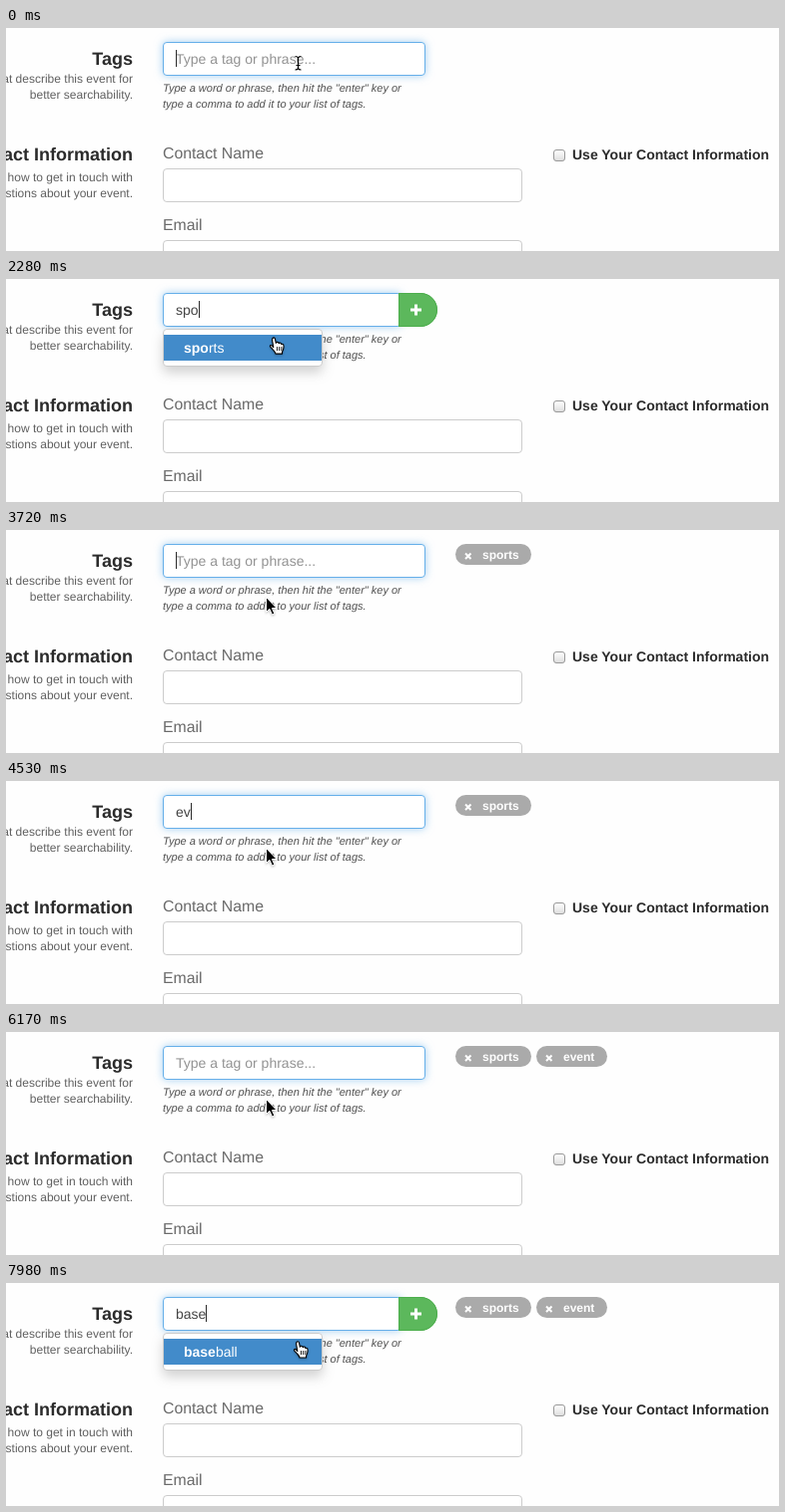
Animation, 774 px wide and 224 px high, one loop 8000 ms. Source, as an HTML page:

```html
<!DOCTYPE html>
<html lang="en">
<head>
<meta charset="utf-8">
<title>Tag input</title>
<style>
html, body { margin: 0; width: 100%; height: 100%; overflow: hidden; background: #fefefe; }
svg { display: block; font: 14px "Liberation Sans", Arial, sans-serif; fill: #2b2b2b; }
text { white-space: pre; text-rendering: geometricPrecision; }
.title { font-size: 18px; font-weight: bold; text-anchor: end; }
.note { font-size: 12px; fill: #606060; text-anchor: end; }
.help { font-size: 11px; font-style: italic; fill: #505050; }
.label { font-size: 15.8px; fill: #6a6a6a; }
.bold { font-weight: bold; }
.field { fill: #fff; stroke: #ccc; }
.menu { fill: #fff; stroke: #ccc; filter: drop-shadow(0 6px 6px rgba(0, 0, 0, .175)); }
.tag text { font-size: 12px; font-weight: bold; fill: #fff; }
.pointer { stroke-linejoin: round; filter: drop-shadow(0 1px 1px rgba(0, 0, 0, .25)); }
</style>
</head>
<body>
<svg width="774" height="224" viewBox="0 0 774 224">
  <text class="title" x="127" y="37">Tags</text>
  <text class="note" x="127" y="55">that describe this event for</text>
  <text class="note" x="127" y="71">better searchability.</text>
  <text class="title" x="127" y="133">Contact Information</text>
  <text class="note" x="127" y="154">know how to get in touch with</text>
  <text class="note" x="127" y="170">questions about your event.</text>

  <text class="help" x="157" y="64">Type a word or phrase, then hit the "enter" key or</text>
  <text class="help" x="157" y="80">type a comma to add it to your list of tags.</text>
  <text class="label" x="157" y="131">Contact Name</text>
  <rect class="field" x="157.5" y="141.5" width="359" height="33" rx="3.5"/>
  <text class="label" x="157" y="203">Email</text>
  <rect class="field" x="157.5" y="213.5" width="359" height="33" rx="3.5"/>

  <linearGradient id="shade" x2="0" y2="1">
    <stop stop-color="#fff"/><stop offset="1" stop-color="#ddd"/>
  </linearGradient>
  <rect x="548.5" y="122.5" width="11" height="11" rx="2.5" fill="url(#shade)" stroke="#999"/>
  <text class="bold" x="567" y="132">Use Your Contact Information</text>

  <rect id="input" class="field" x="157.5" y="14.5" height="33" rx="3.5"/>
  <text id="typed" x="170" y="36"></text>
  <rect id="caret" y="22" width="1" height="17"/>
  <g id="add">
    <path fill="#5cb85c" d="M393 14h22a17 17 0 0 1 0 34h-22z"/>
    <path fill="none" stroke="#4cae4c" d="M393.5 14.5h21.5a16.5 16.5 0 0 1 0 33h-21.5z"/>
    <path stroke="#fff" stroke-width="3" d="M405 31h11M410.5 25.5v11"/>
  </g>

  <g class="tag">
    <rect x="450" y="14" width="76" height="21" rx="10.5" fill="#aaa"/>
    <path stroke="#fff" stroke-width="2" d="M460 23.5l5.5 5.5m0-5.5l-5.5 5.5"/>
    <text x="477" y="29">sports</text>
  </g>
  <g class="tag">
    <rect x="531" y="14" width="71" height="21" rx="10.5" fill="#aaa"/>
    <path stroke="#fff" stroke-width="2" d="M541 23.5l5.5 5.5m0-5.5l-5.5 5.5"/>
    <text x="558" y="29">event</text>
  </g>

  <g id="menu">
    <rect class="menu" x="157.5" y="50.5" width="159" height="37" rx="3.5"/>
    <rect x="158" y="56" width="158" height="26" fill="#428bca"/>
    <text x="178" y="74" fill="#fff"><tspan id="match" class="bold"></tspan><tspan id="rest"></tspan></text>
  </g>

  <g id="beam" fill="none">
    <path id="beamShape" d="M-3-6.5q2.5 0 3 1.5q.5-1.5 3-1.5M-3 7q2.5 0 3-1.5q.5 1.5 3 1.5M0-5V5.5M-2 2.5h4" stroke-width="1.2" stroke="#000"/>
  </g>
  <path id="arrow" class="pointer" stroke="#fff" fill="#000" d="M.5.5v15l3.4-3.2 2.6 5.8 2.4-1-2.5-5.6h4.6z"/>
  <g id="hand" class="pointer">
    <path fill="#fff" stroke="#000" stroke-width="1.1" transform="translate(-3 3)"
      d="M3.8 10.5L2.6 3Q2.5 1 4 .8 5.3.7 5.6 2.5L6.3 6.3Q6.8 5 8 5.3 9 5.4 9.2 6.6 9.8 5.8 10.9 6.1 11.7 6.4 11.8 7.5 13 6.8 13.8 7.8 14.4 9.5 13.9 11.5 13.5 13.5 12.6 15V17H6Q5.5 15 3.5 13L1 10.3Q0 9 1 8.4 2 8 3.8 10.5z"/>
    <path fill="none" stroke="#000" stroke-width=".9" d="M4.5 13v4M6.7 13v4M8.9 13v4"/>
  </g>
</svg>
<script>
const LOOP = 8000, BLINK = 570;
const $ = id => document.getElementById(id);
const tags = document.querySelectorAll('.tag');
const show = (el, on) => { el.style.display = on ? '' : 'none'; };

// start, typed text, add button, tag count, matched part, rest of suggestion
const states = [
  [-300, '', 0, 0], [420, 's', 0, 0], [780, 'sp', 1, 0], [860, 'spo', 1, 0],
  [920, 'spo', 1, 0, 'spo', 'rts'],
  [2580, '', 0, 1], [3990, 'e', 0, 1], [4530, 'ev', 0, 1], [4560, 'ev', 1, 1],
  [4730, 'eve', 1, 1], [4790, 'even', 1, 1], [5510, 'event', 1, 1],
  [5600, '', 0, 2], [6740, 'b', 0, 2], [7010, 'ba', 1, 2],
  [7190, 'ba', 1, 2, 'ba', 'seball'], [7370, 'bas', 1, 2, 'ba', 'seball'],
  [7520, 'base', 1, 2, 'base', 'ball']
];

// time, x, y of the pointer
const path = [
  [0, 292.5, 35], [1940, 292.5, 35], [1980, 292.5, 39], [2120, 292.5, 39],
  [2280, 267, 55], [2420, 260, 67], [7540, 260, 67], [7680, 292, 63],
  [7800, 300, 59], [7970, 291, 55], [LOOP, 291, 55]
];

// time, strength of the focus glow
const focus = [[0, 1], [2500, 1], [2580, .45], [2650, 1], [LOOP, 1]];

function at(keys, t) {
  const i = keys.findIndex(k => k[0] > t);
  const a = keys[i - 1], b = keys[i], p = (t - a[0]) / (b[0] - a[0]);
  return a.slice(1).map((v, n) => v + (b[n + 1] - v) * p);
}

function draw(t) {
  const past = states.filter(s => s[0] <= t);
  const [, text, button, count, match, rest] = past[past.length - 1];
  const typedAt = past.reduce((last, s) => s[1] === last[1] ? last : s)[0];

  const [glow] = at(focus, t);
  const mix = (a, b) => Math.round(a + (b - a) * glow);
  $('input').setAttribute('width', button ? 238 : 262);
  $('input').style.stroke = `rgb(${mix(204, 102)},${mix(204, 175)},${mix(204, 233)})`;
  $('input').style.filter = `drop-shadow(0 0 4px rgba(102,175,233,${.6 * glow}))`;

  $('typed').textContent = text || 'Type a tag or phrase...';
  $('typed').style.fill = text ? '#444' : '#939393';
  $('caret').setAttribute('x', 170 + (text ? Math.round($('typed').getComputedTextLength()) : 0));
  show($('caret'), Math.floor((t - typedAt) / BLINK) % 2 === 0);
  show($('add'), button);
  tags.forEach((tag, i) => show(tag, i < count));
  show($('menu'), match);
  $('match').textContent = match || '';
  $('rest').textContent = rest || '';

  const [x, y] = at(path, t);
  const kind = y < 48 ? 'beam' : match ? 'hand' : 'arrow';
  for (const id of ['beam', 'hand', 'arrow']) show($(id), id === kind);
  $(kind).setAttribute('transform', `translate(${x} ${y})`);
}

function tick() {
  draw(performance.now() % LOOP);
  requestAnimationFrame(tick);
}
tick();
</script>
</body>
</html>
```
